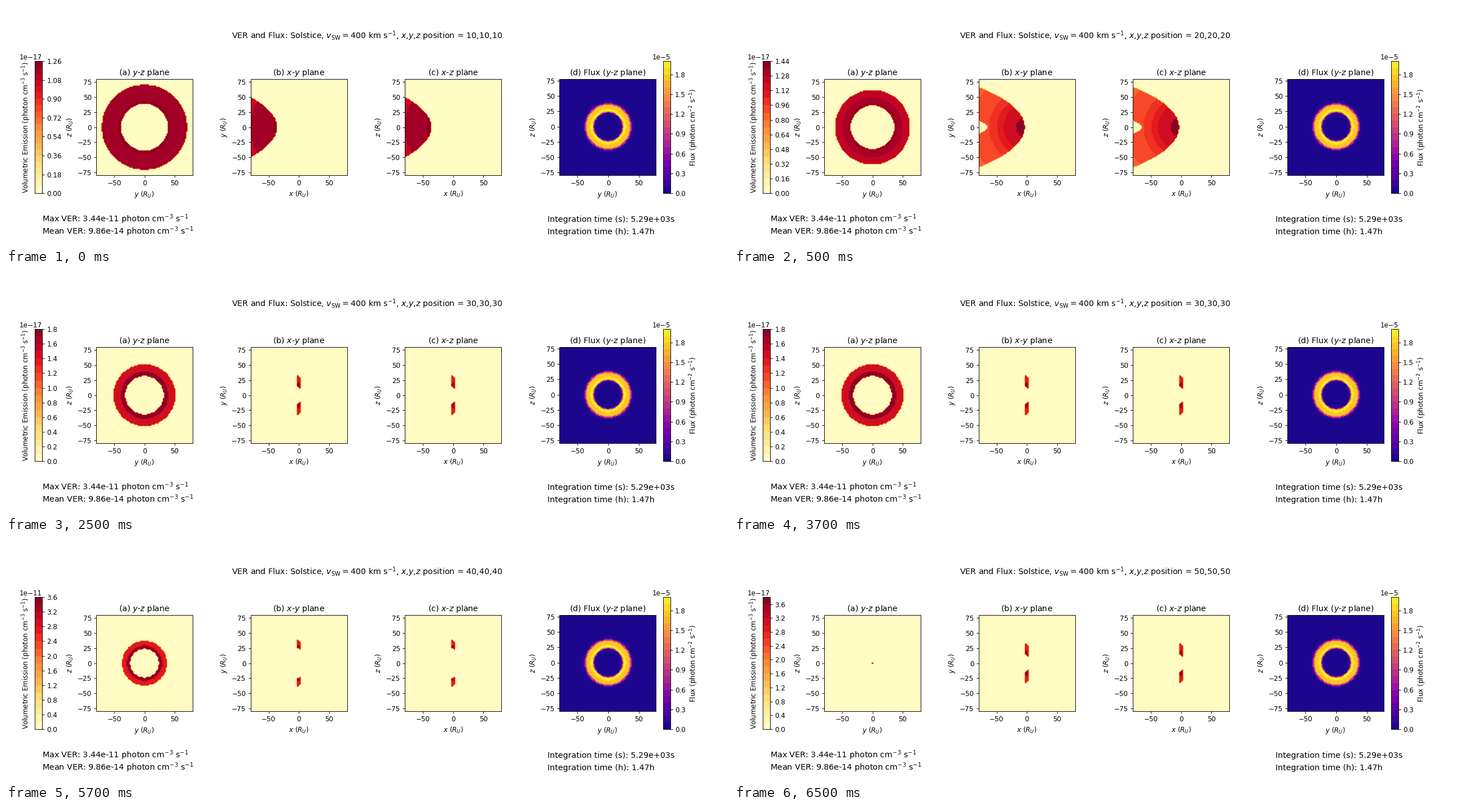
These frames come from a looping animation (1280x427 px, 8 s). A matplotlib script:

```python
import numpy as np
import matplotlib.pyplot as plt
from matplotlib.animation import FuncAnimation

DPI = 1280 / 15
STEP_MS = 500
FRAMES = 16
BANDS = 20

# Emission falls off in shells of distance from the planet (units of 1e-17).
SHELLS = [30, 43.5, 55.5, 63.5, 73.5, 100]
LEVELS = np.array([3.7, 1.75, 1.43, 1.32, 1.24, 1.17, 1.05])

grid = np.linspace(-80, 80, 81)
U, V = np.meshgrid(grid, grid)


def surface(nose, flare, cos):
    """Distance of a flared boundary from the planet at a given angle."""
    return nose * (2 / (1 + cos + 1e-9)) ** flare


def emission(x, y, z):
    """Emission between the magnetopause and the bow shock."""
    r = np.sqrt(x**2 + y**2 + z**2)
    cos = x / np.maximum(r, 1e-9)
    sheath = (r >= surface(16, 0.6, cos)) & (r <= surface(20, 0.88, cos) + 1e-6)
    faint = LEVELS[np.searchsorted(SHELLS, r)] * 1e-17
    # A thin disc around x = 0 is far brighter, most of all on its inner rim.
    disc = np.where((r < 28.3) & (x <= 0), 3.44e-11, 2.79e-11)
    return np.where(sheath, np.where(np.abs(x) <= 2, disc, faint), 0.0)


def line_of_sight(y, z):
    total = sum(emission(x + 0 * y, y, z) for x in (-2, 0, 2))
    return total * 1.99e-5 / total.max()


flux_grid = np.arange(-80, 80, 2)
FU, FV = np.meshgrid(flux_grid, flux_grid)
FLUX = line_of_sight(FU, FV)

fig = plt.figure(figsize=(15, 1281 / 256), dpi=DPI, facecolor="white")


def panel(ax, data, title, xname, yname, cmap="YlOrRd"):
    filled = ax.contourf(*data, BANDS, cmap=cmap)
    ax.set_aspect("equal")
    ax.set_xticks([-50, 0, 50])
    ax.set_yticks(range(-75, 76, 25))
    ax.set_title(title)
    ax.set_xlabel(f"${xname}$ ($R_U$)")
    ax.set_ylabel(f"${yname}$ ($R_U$)")
    return filled


def bar(filled, left, label, side):
    cax = fig.add_axes([left, 0.22, 0.01, 0.55])
    fig.colorbar(filled, cax=cax).set_label(label)
    cax.yaxis.set_label_position(side)


def note(x, y, text, **kw):
    fig.text(x, y, text, fontsize=12, va="baseline", **kw)


def position_index(k):
    """The first slice shows for one step, each later one for four."""
    return 10 * (1 + (k + 3) // 4)


def draw(k):
    index = position_index(k)
    p = grid[index] + 0 * U
    fig.clear()
    a, b, c, d = fig.subplots(1, 4, gridspec_kw={"wspace": 0.6})

    ver = panel(a, (U, V, emission(p, U, V)), "(a) $y$-$z$ plane", "y", "z")
    panel(b, (U, V, emission(U, V, p)), "(b) $x$-$y$ plane", "x", "y")
    panel(c, (U, V, emission(U, p, V)), "(c) $x$-$z$ plane", "x", "z")
    flux = panel(d, (FU, FV, FLUX), "(d) Flux ($y$-$z$ plane)", "y", "z", "plasma")

    bar(ver, 0.04, "Volumetric Emission (photon cm$^{-3}$ s$^{-1}$)", "left")
    bar(flux, 0.91, "Flux (photon cm$^{-2}$ s$^{-1}$)", "right")

    note(0.5, 1 - 58 / 427,
         r"VER and Flux: Solstice, $v_{\mathrm{SW}} = 400$ km s$^{-1}$, "
         f"$x$,$y$,$z$ position = {index},{index},{index}", ha="center")
    note(0.05, 0.10, "Max VER: 3.44e-11 photon cm$^{-3}$ s$^{-1}$")
    note(0.05, 0.05, "Mean VER: 9.86e-14 photon cm$^{-3}$ s$^{-1}$")
    note(0.75, 0.10, "Integration time (s): 5.29e+03s")
    note(0.75, 0.05, "Integration time (h): 1.47h")
    return []


anim = FuncAnimation(fig, draw, frames=FRAMES, interval=STEP_MS,
                     repeat=True, repeat_delay=0, cache_frame_data=False)
plt.show()
```
